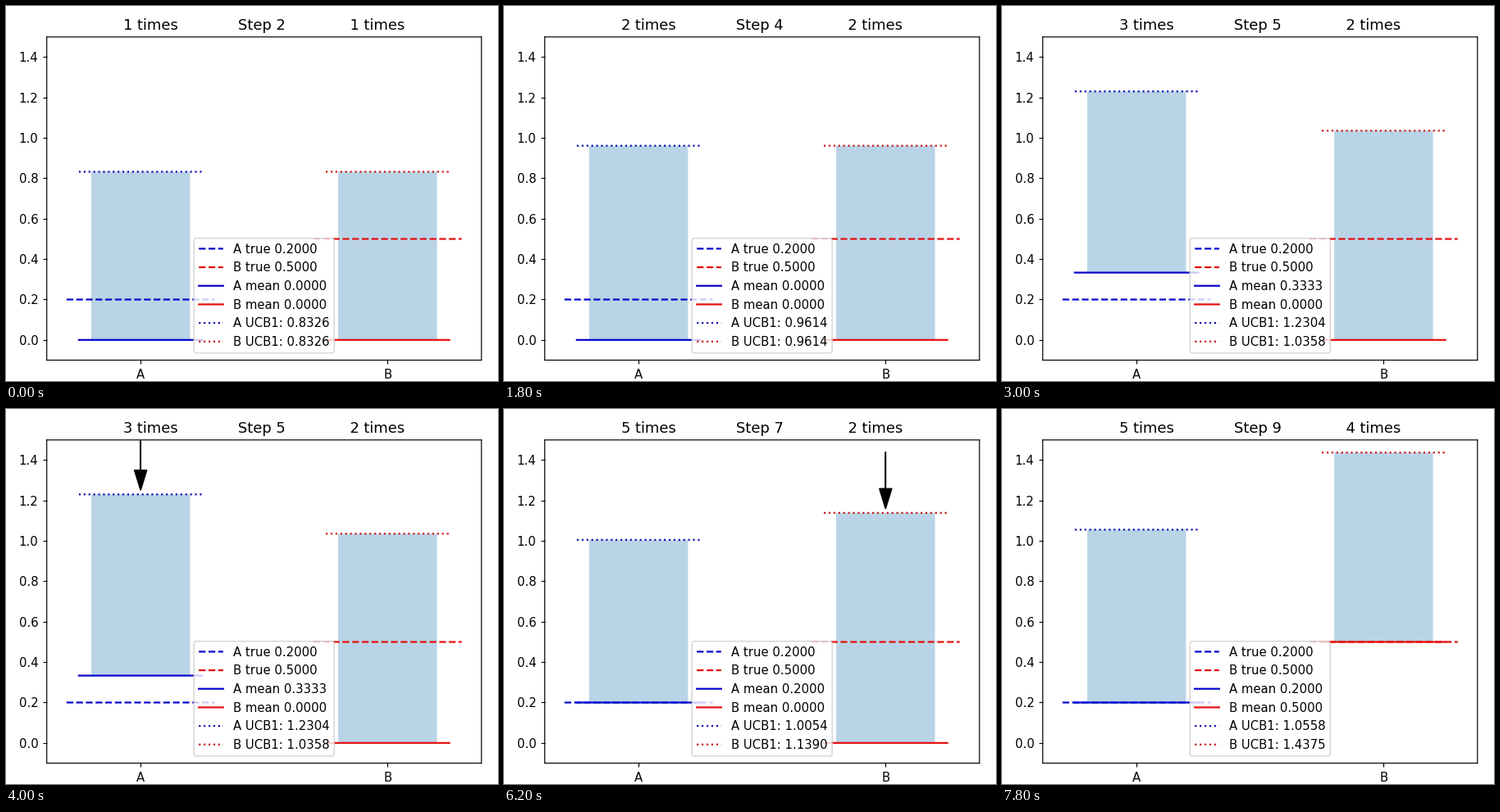
A matplotlib script that plays this animation: 600x458 px, repeating every 8000 ms.

```python
import math

import matplotlib.pyplot as plt
from matplotlib.animation import FuncAnimation

W, H, DPI = 600, 458, 106.85
LEFT, RIGHT, TOP, BOTTOM = 49.7, 579.8, 37.8, 432.5   # plot area in pixels
FRAMES, INTERVAL = 40, 200
STEP_LEN, LEAD = 6, 3        # frames per step, frames of the first step already gone
ARROW_FROM = 4               # frame within a step at which the arrow appears

NAMES = "AB"
TRUE = (0.2, 0.5)
REWARDS = (0, 0, 0, 0, 1, 0, 0, 1, 1)
LINE = ("#0606cc", "#e41010")
DOTS = ("#1010b4", "#cc1818")
BAR = "#b9d4e6"

plt.rcParams["path.snap"] = False   # soft edges between pixels


def ucb(wins, pulls, t):
    return wins / pulls + math.sqrt(2 * math.log(t) / (pulls + 1))


def play():
    """Run the bandit; map each step to (pulls, means, bounds, next arm)."""
    pulls, wins, log = [0, 0], [0, 0], {}
    arm = 0
    for t, reward in enumerate(REWARDS, 1):
        pulls[arm] += 1
        wins[arm] += reward
        if t == 1:
            arm = 1
            continue
        means = [w / n for w, n in zip(wins, pulls)]
        bounds = [ucb(w, n, t) for w, n in zip(wins, pulls)]
        arm = bounds.index(max(bounds))
        log[t] = (tuple(pulls), means, bounds, arm)
    return log


LOG = play()

fig = plt.figure(figsize=((W + 1e-6) / DPI, (H + 1e-6) / DPI), dpi=DPI,
                 facecolor="white")
ax = fig.add_axes([LEFT / W, 1 - BOTTOM / H, (RIGHT - LEFT) / W,
                   (BOTTOM - TOP) / H])


def level_lines(values, half, style, colors, label):
    for x, y in enumerate(values):
        ax.plot([x - half, x + half], [y, y], style, color=colors[x],
                label=f"{NAMES[x]} {label} {y:.4f}")


def draw(i):
    turn, phase = divmod(i + LEAD, STEP_LEN)
    step = turn + 2
    pulls, means, bounds, arm = LOG[step]

    ax.clear()
    heights = [b - m for b, m in zip(bounds, means)]
    ax.bar([0, 1], heights, width=0.4, bottom=means, color=BAR)
    level_lines(TRUE, 0.3, "--", LINE, "true")
    level_lines(means, 0.25, "-", LINE, "mean")
    level_lines(bounds, 0.25, ":", DOTS, "UCB1:")
    if phase >= ARROW_FROM:
        ax.arrow(arm, bounds[arm] + 0.3, 0, -0.18, head_width=0.05,
                 head_length=0.1, color="black")

    ax.set_xlim(-0.38, 1.38)
    ax.set_ylim(-0.1, 1.5)
    ax.set_xticks([0, 1], list(NAMES))
    ax.set_title(f"{pulls[0]} times" + " " * 13 + f"Step {step}"
                 + " " * 14 + f"{pulls[1]} times", fontsize=12.06)
    ax.legend(loc="lower center", labelspacing=0.517, borderaxespad=0.58)
    return []


anim = FuncAnimation(fig, draw, frames=FRAMES, interval=INTERVAL,
                     init_func=lambda: draw(0), repeat=True, repeat_delay=0)
plt.show()
```
